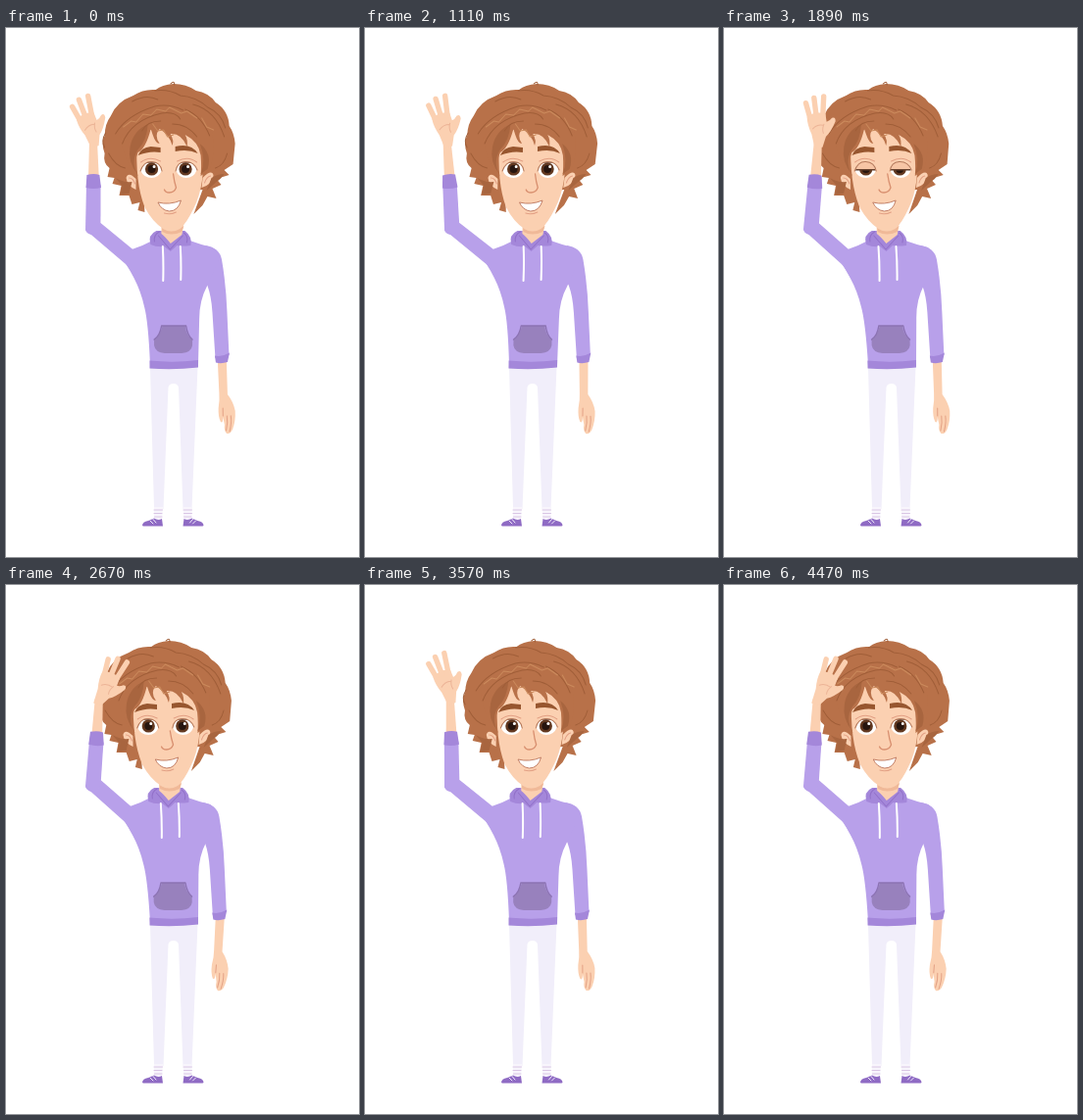
Animation, 360 px wide and 540 px high, one loop 4500 ms. Source, as an HTML page:

```html
<!DOCTYPE html>
<html lang="en">
<head>
<meta charset="utf-8">
<title>Waving hello</title>
<style>
html, body { margin: 0; width: 100%; height: 100%; overflow: hidden; background: #fff }
svg { display: block; width: 360px; height: 540px }
.skin { fill: #fbd0b1 }
.top { fill: #b8a0ea }
.trim { fill: #a487da }
.hair { fill: #b87149 }
.dark { fill: #a8653f }
.line { fill: none; stroke-linecap: round; stroke-linejoin: round }
.strand { stroke: #a05e38; stroke-width: 1 }
.shine { stroke: #cb8a5c; stroke-width: 1 }
.crease { stroke: #e3a185; stroke-width: 1 }
.finger { stroke: #fbd0b1; stroke-width: 5.4 }
</style>
</head>
<body>
<svg viewBox="0 0 360 540">
  <defs>
    <clipPath id="eyes"><path d="M137 146Q140 136 148 136.500Q157 137 158 146Q155 153 148 153Q140 153 137 146ZM173 146Q174 137 182 136.500Q191 136 194 145Q191 153 183 153Q176 153 173 146Z"/></clipPath>
    <g id="shoe">
      <path d="M151 489H160L159 504H151Z" fill="#f8f5fc"/>
      <path class="line" d="M151 492H159.500M151 495.500H159M151.500 499H159" stroke="#d9c5e4" stroke-width="1"/>
      <path d="M139 508Q139 504 145 503L151 500.500Q155 503 159 501L160 508.500H140Z" fill="#8f6bc4"/>
      <path class="line" d="M147 503L150 506M150 501.500L153 505" stroke="#efe9fa" stroke-width="1"/>
    </g>
  </defs>

  <path d="M147 346H195.500L189.500 491H180.500L176 367Q175 363 171 363Q166 363 165.500 367L160.500 491H151Z" fill="#f1eefa"/>
  <use href="#shoe"/>
  <use href="#shoe" transform="matrix(-1 0 0 1 340.500 0)"/>

  <g id="sideArm">
    <g id="sideHand">
      <path class="skin" d="M215.500 340H224.500L225 374Q231 382 232.500 391Q233 401 229.500 410Q227 415 223.500 414Q220.500 411 221.500 405L220 397Q220 404 217.500 402Q215 397 215.500 388Q217 380 216.500 373Z"/>
      <path class="line crease" d="M224 396Q225 403 223 411M228 396Q229 403 226.500 412M220 388V396"/>
    </g>
    <path class="top" d="M203 222Q217 224 219.500 236Q224 262 225 290L227 334L213 337L210 290Q209 274 205 263L196 246Z"/>
    <path class="trim" d="M212.500 334.500Q220 336 227.500 331.500L225.500 341Q219 343 213.500 341.500Z"/>
  </g>

  <path id="upperArm" class="top"/>

  <g id="torso">
    <path class="top" d="M128 226Q140 222 149 217H187Q198 221 210 224L218 234L205 263Q197 278 197 297L196 344H147Q145 300 141 285Q136 262 122 241Z"/>
    <path d="M159.500 304H182.500Q184 314 190 318V324Q189 331 179 332H162Q152 331 151 324V318Q157 314 159.500 304Z" fill="#9881bd"/>
    <path class="line" d="M158.500 304Q157 314 151 318M183.500 304Q185 314 190 318M159 304H183" stroke="#8c73b3" stroke-width="1.400"/>
    <path class="trim" d="M146.500 339.500Q171 342 196 339L196 346.500Q171 349.500 146.500 347.500Z"/>
    <path class="trim" d="M147 221Q144 211 153 207H182Q190 213 188 222Q180 223 174 222L167.500 228L161 223Q154 224 147 221Z"/>
    <path class="line" d="M151 218Q150 211 156 208M184 219Q186 213 181 209M155 212L167 226L180 212" stroke="#9271c9" stroke-width="1"/>
    <path class="skin" d="M158 193H182L179 211Q174 215 167.500 220Q162 213 158 210Z"/>
    <path d="M158.500 204Q168 211 181 202L179 208Q168 213 159 208Z" fill="#f0b998"/>
    <path class="line" d="M159.500 223Q160.500 240 160 258M177.500 223Q178.500 240 178 257" stroke="#fff" stroke-width="2"/>

    <path class="hair" d="M134 186L141 188L140 170L200 165L191 190L200 181L205 172L214 174L210 164L219 160L214 154L227 150L222 145L231 139L233 118Q232 107 227 100Q226 84 213 76Q206 66 193 64Q183 57 170 57Q158 58 152 63Q139 62 129 69Q112 75 106 90Q100 98 100 110Q96 117 100 128Q98 138 105 143L103 152L110 153L108 159L117 161L115 171L125 171L128 180L136 178Z"/>
    <path class="skin" d="M132 154Q124 146 122 153Q123 161 132 165ZM200 153Q209 144 211 150Q211 159 199 163Z"/>
    <path class="line crease" d="M125 153Q129 153 131 159M208 151Q204 152 202 158"/>
    <path class="skin" d="M133 115Q150 96 172 100Q196 98 200 124Q203 160 191 184Q184 199 177 205Q168 210 160 205Q149 198 141 183Q131 158 133 115Z"/>

    <path class="hair" d="M134 151Q129 138 134 127Q142 123 147 103L149 109Q152 118 156 118Q150 110 156 103Q166 109 169 120Q171 115 167 108Q178 107 184 121Q185 114 182 109Q196 116 198 130Q199 142 198 151L207 145Q214 127 209 103L190 78L145 82L116 110Q120 138 134 151Z"/>
    <path class="dark" d="M134 150Q126 137 134 124Q143 115 144 98Q129 105 126 121Q123 137 134 150ZM198 149Q204 135 197 118Q210 128 205 144ZM111 153Q119 158 128 157L125 169L116 170L118 161ZM204 166L213 158Q219 154 222 149Q215 149 209 153Z"/>
    <path class="line strand" d="M111 108Q122 89 151 80Q166 77 180 84M118 118Q127 94 158 87Q172 85 177 93M151 64Q165 62 177 69Q193 70 205 81Q219 87 223 102M182 83Q199 90 207 110M190 78Q213 84 222 111M104 128Q111 141 121 143M225 128Q222 140 213 143M128 75Q142 67 154 73M138 105Q143 95 157 95M169 98Q184 98 194 111M167 57Q171 53 171 58M100 122Q96 115 101 107"/>
    <path class="line shine" d="M119 101L127 95L132 96L139 88L147 89L153 83L162 85L166 81L178 87L184 85L194 92M149 98L154 105L160 104L164 111L170 109M199 92L204 101L211 104"/>

    <path d="M134 130Q137 122 147 121L157 122V127Q146 125 134 130ZM172 126V121Q188 117 195 128Q185 123 172 126Z" fill="#97562f"/>
    <g clip-path="url(#eyes)">
      <path fill="#fff" d="M130 130H200V160H130Z"/>
      <g fill="#623820"><circle cx="148" cy="144" r="6.600"/><circle cx="182.500" cy="144" r="6.600"/></g>
      <g fill="#26150f"><circle cx="148" cy="144" r="4"/><circle cx="182.500" cy="144" r="4"/></g>
      <g fill="#fff"><circle cx="150.500" cy="141.500" r="1.500"/><circle cx="185" cy="141.500" r="1.500"/></g>
      <g id="lids"><path fill="#f7c5a5" d="M130 116H200V137H130Z"/><path class="line" d="M130 137H200" stroke="#65402d" stroke-width="1.500"/></g>
    </g>
    <path class="line" d="M136.500 146Q140 136 148 136.500Q157 137 158.500 146M172.500 146Q174 137 182 136.500Q191 136 194.500 145" stroke="#b5795b" stroke-width="1"/>
    <path class="line crease" d="M137 137Q146 130 157 136M174 136Q185 130 194 137M161 189Q167 191 173 188"/>
    <path class="line" d="M170 149Q171 157 173 163Q171 168 166 168Q162 168 161 165" stroke="#d88f6f" stroke-width="1.300"/>
    <path d="M154.500 178Q166 181 178 176Q175 187 166 187Q158 186 154.500 178Z" fill="#fff" stroke="#bd765c" stroke-width=".9"/>
  </g>

  <g id="forearm">
    <path class="skin" d="M84.500 156L86 116Q90 113 94 116L95.500 156Z"/>
    <g id="hand">
      <path class="skin" d="M-4 5L-5 -10Q-8 -20 -7 -28Q3 -33 12 -28L12 -20Q15 -20 18 -23Q22 -24 21 -19Q15 -9 9 -5L4 5Z"/>
      <path class="line finger" d="M-4 -26L-6 -42M2.500 -27L3 -46M9 -26L13 -46"/>
      <path class="line crease" d="M-3 -15Q2 -19 8 -17M9 -18Q6 -13 7 -9" stroke-opacity=".6"/>
    </g>
    <path class="top" d="M82.500 160H97L96.500 202Q95 211 87 211Q82 210 81 206Z"/>
    <path class="trim" d="M83 150Q90 148 96 150L97.500 163Q90 165 82 163Z"/>
  </g>
</svg>
<script>
const LOOP = 4500, SWAY = 600, LEAN = 0.0219, HEM = 345;
const part = id => document.getElementById(id);
const move = (id, transform) => part(id).setAttribute('transform', transform);
const wave = (t, peak) => Math.cos((t - peak) / SWAY * 2 * Math.PI);

function draw(t) {
  const sway = wave(t, 473) - 0.1;
  const lean = LEAN * sway;
  const shoulder = lean * 115;
  const armTurn = -5 * sway;
  const handTurn = -1 + 22 * wave(t, 275) - armTurn;
  const blink = Math.max(0, 1 - Math.abs(t - 1950) / 130);

  move('torso', `matrix(1 0 ${-lean} 1 ${HEM * lean} 0)`);
  move('forearm', `rotate(${armTurn} 88 205)`);
  move('hand', `translate(90 117) rotate(${handTurn})`);
  move('sideArm', `translate(${3.5 * sway} 0)`);
  move('sideHand', `rotate(${2 - 3.1 * wave(t, 30)} 220 345)`);
  move('lids', `translate(0 ${14 * blink})`);
  const x = n => n + shoulder;
  part('upperArm').setAttribute('d',
    `M81 206L96.500 199L${x(129)} 226L${x(150)} 232L${x(137)} 266L${x(124)} 243Z`);
}

const start = performance.now();
function tick() {
  draw((performance.now() - start) % LOOP);
  requestAnimationFrame(tick);
}
tick();
</script>
</body>
</html>
```
